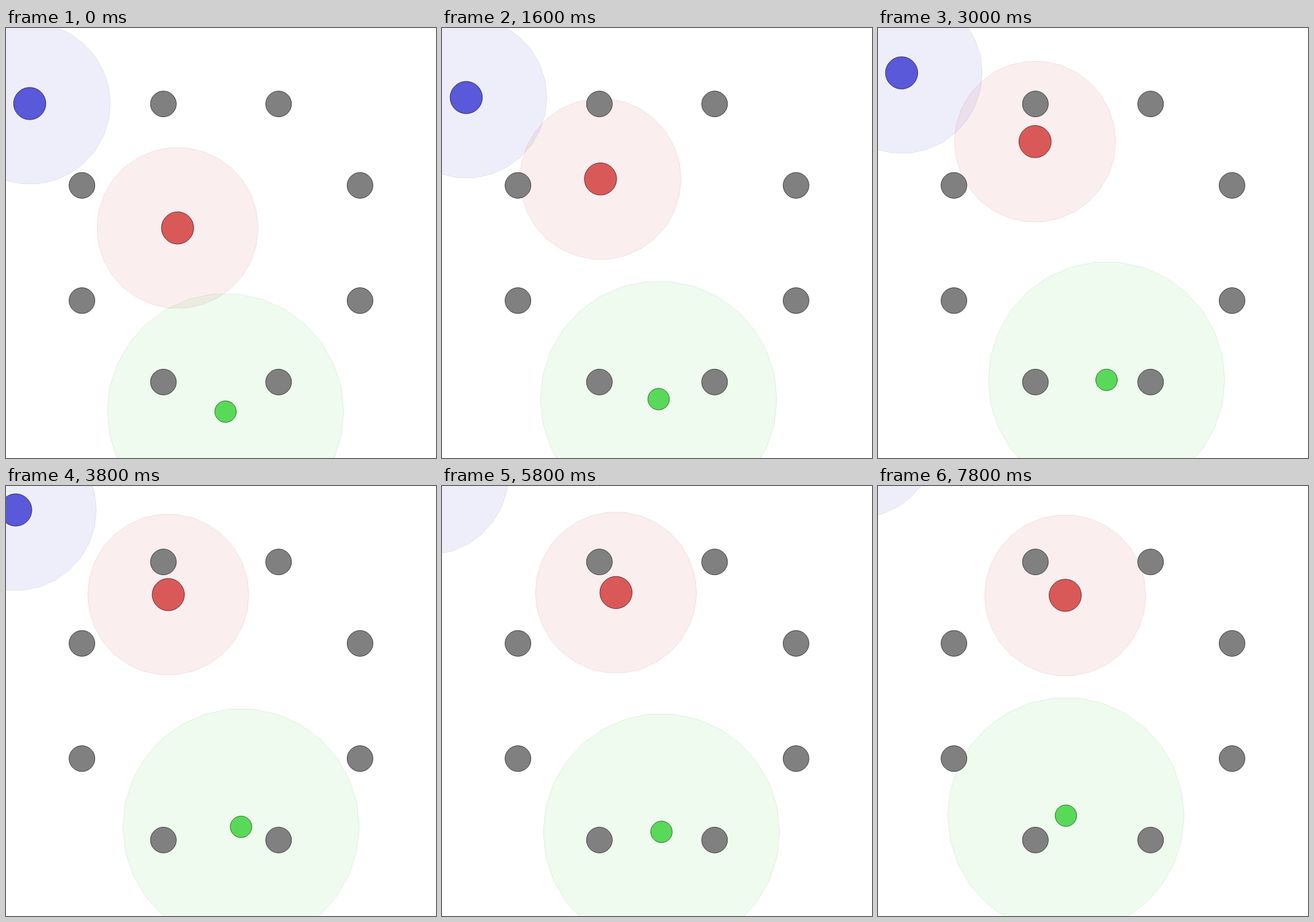
These frames come from a looping animation (700 by 700 pixels, 8 s). An HTML page with a canvas:

```html
<!DOCTYPE html>
<html lang="en">
<head>
<meta charset="utf-8">
<title>Moving agents</title>
<style>
  html, body { margin: 0; width: 100%; height: 100%; overflow: hidden; background: #fff; }
  canvas { display: block; width: 100vmin; height: 100vmin; }
</style>
</head>
<body>
<canvas id="stage" width="700" height="700"></canvas>
<script>
const ctx = document.getElementById('stage').getContext('2d');
const SIZE = 700, STEP_MS = 200, STEPS = 40, SIDES = 30;

// Steps at which every agent passes one of its waypoints.
const passes = [0, 4, 12, 19, 26, 33, 39];
const last = passes.length - 1;

const agents = [
  { color: [217, 89, 89], radius: 26.25, range: 131.25,
    points: [[279.3, 325.5], [268.5, 295.4], [252.4, 199.5], [264.2, 176.8],
             [277.6, 170.1], [291.1, 179], [304.8, 178]] },
  { color: [89, 89, 217], radius: 26.25, range: 131.25,
    points: [[38.6, 123], [28.3, 121.4], [49.6, 96], [15.8, 39],
             [-15.8, -2.4], [-28.5, -42], [-34.8, -79]] },
  { color: [89, 217, 89], radius: 17.5, range: 192.5,
    points: [[357.4, 624.5], [349.5, 616.8], [362, 588.1], [382.6, 554.8],
             [367.1, 551], [340.6, 574.6], [305.9, 536.7]] }
];

const landmarks = Array.from({ length: 8 }, (_, i) => {
  const angle = (i + 0.5) * Math.PI / 4;
  return { x: 350 + 245 * Math.cos(angle), y: 350 + 245 * Math.sin(angle) };
});

const gap = i => passes[i + 1] - passes[i];

// Smooth cubic curve through the values, evaluated at one step.
function glide(values, step) {
  const rate = i => (values[i + 1] - values[i]) / gap(i);
  const slope = i => {
    if (i === 0) return 2 * rate(0) - slope(1);
    if (i === last) return 2 * rate(last - 1) - slope(last - 1);
    return (gap(i) * rate(i - 1) + gap(i - 1) * rate(i)) / (gap(i - 1) + gap(i));
  };
  let i = 0;
  while (i < last - 1 && step >= passes[i + 1]) i++;
  const u = (step - passes[i]) / gap(i), w = 1 - u;
  return w * w * (1 + 2 * u) * values[i] + u * u * (3 - 2 * u) * values[i + 1]
    + gap(i) * u * w * (w * slope(i) - u * slope(i + 1));
}

function disc({ x, y }, radius, color, alpha) {
  ctx.beginPath();
  for (let i = 0; i < SIDES; i++) {
    const angle = i * 2 * Math.PI / SIDES;
    ctx.lineTo(x + radius * Math.cos(angle), y + radius * Math.sin(angle));
  }
  ctx.closePath();
  ctx.fillStyle = `rgba(${color}, ${alpha})`;
  ctx.fill();
  ctx.strokeStyle = `rgba(${color.map(c => c / 2)}, ${alpha})`;
  ctx.stroke();
}

function draw() {
  const step = Math.floor(performance.now() / STEP_MS) % STEPS;
  ctx.fillStyle = '#fff';
  ctx.fillRect(0, 0, SIZE, SIZE);
  const spots = agents.map(({ points }) => ({
    x: glide(points.map(p => p[0]), step),
    y: glide(points.map(p => p[1]), step)
  }));
  agents.forEach((a, i) => disc(spots[i], a.range, a.color, 0.1));
  agents.forEach((a, i) => disc(spots[i], a.radius, a.color, 1));
  landmarks.forEach(spot => disc(spot, 21, [128, 128, 128], 1));
  requestAnimationFrame(draw);
}

draw();
</script>
</body>
</html>
```
